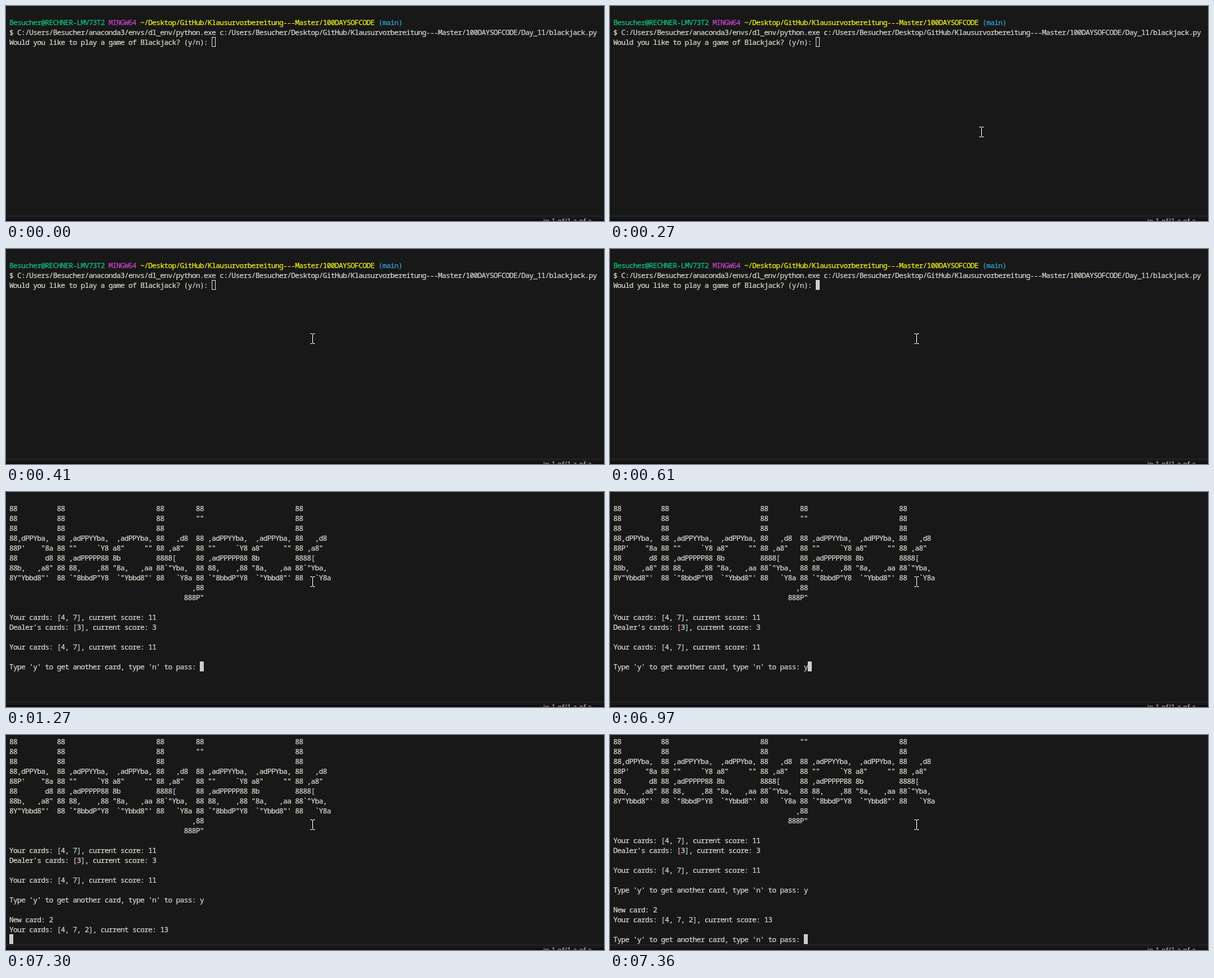
Write an HTML page that moves like this. It is 904 px wide and 326 px high and loops after 8 s.

```html
<!DOCTYPE html>
<html lang="en">
<head>
<meta charset="utf-8">
<title>Blackjack in the terminal</title>
<style>
  html, body { margin: 0; width: 100%; height: 100%; overflow: hidden; background: #181818; }
  #stage { position: relative; width: 904px; height: 326px; overflow: hidden; background: #181818; }
  #stage > * { position: absolute; }
  #term {
    left: 5px; top: 2px; margin: 0; color: #dadad0;
    font: 11px/15px "Noto Sans Mono", "DejaVu Sans Mono", monospace;
    letter-spacing: calc(6px - 1ch);
    font-variant-ligatures: none;
    -webkit-text-stroke: 0.2px currentColor;
  }
  .user { color: #10c880; }
  .sys { color: #c846c8; }
  .dir { color: #f5f51c; }
  .branch { color: #2fa8d8; }
  .open { color: #e3a6e0; }
  .close { color: #a9cfe6; }
  #caret { width: 6px; height: 15px; box-sizing: border-box; border: 1px solid #ccc; }
  #caret.solid { background: #ccc; }
  #rule { left: 0; top: 318px; width: 904px; height: 1px; background: #2b2b2b; }
  #bar { left: 0; top: 323px; width: 904px; height: 3px; background: #140c11; }
  #status { left: 812px; top: 318px; color: #c9c2b8; white-space: pre; font: 11px/16px "Open Sans", sans-serif; }
  #mouse { left: 0; top: 0; filter: drop-shadow(-1px 0 #000); }
</style>
</head>
<body>
<div id="stage">
  <pre id="term"></pre>
  <div id="caret"></div>
  <div id="rule"></div>
  <div id="bar"></div>
  <div id="status">in 1 of/1 a of a</div>
  <svg id="mouse" width="7" height="16" shape-rendering="crispEdges">
    <path d="M0 0h3v1h1v-1h3v1h-3v14h3v1h-3v-1h-1v1h-3v-1h3v-14h-3z" fill="#fff"/>
  </svg>
</div>
<template id="art">88          88                       88        88                       88
88          88                       88        ""                       88
88          88                       88                                 88
88,dPPYba,  88 ,adPPYYba,  ,adPPYba, 88   ,d8  88 ,adPPYYba,  ,adPPYba, 88   ,d8
88P'    "8a 88 ""     `Y8 a8"     "" 88 ,a8"   88 ""     `Y8 a8"     "" 88 ,a8"
88       d8 88 ,adPPPPP88 8b         8888[     88 ,adPPPPP88 8b         8888[
88b,   ,a8" 88 88,    ,88 "8a,   ,aa 88`"Yba,  88 88,    ,88 "8a,   ,aa 88`"Yba,
8Y"Ybbd8"'  88 `"8bbdP"Y8  `"Ybbd8"' 88   `Y8a 88 `"8bbdP"Y8  `"Ybbd8"' 88   `Y8a
                                              ,88
                                            888P"</template>
<script>
const LOOP = 8000, CELL_W = 6, CELL_H = 15, LEFT = 5, TOP = 2;
const $ = id => document.getElementById(id);
const span = (cls, text) => `<span class="${cls}">${text}</span>`;
const tint = line => line
  .replace(/\[/g, span("open", "["))
  .replace(/\]/g, span("close", "]"));

const repo = "Desktop/GitHub/Klausurvorbereitung---Master/100DAYSOFCODE";
const ask = "Would you like to play a game of Blackjack? (y/n): ";
const more = "Type 'y' to get another card, type 'n' to pass: ";
const hand = "Your cards: [4, 7], current score: 11";

const intro = [
  "",
  [span("user", "Besucher@RECHNER-LMV73T2"), span("sys", "MINGW64"),
   span("dir", "~/" + repo), span("branch", "(main)")].join(" "),
  `$ C:/Users/Besucher/anaconda3/envs/dl_env/python.exe c:/Users/Besucher/${repo}/Day_11/blackjack.py`
];
const deal = [
  "", ...$("art").innerHTML.split("\n"), "",
  hand, "Dealer's cards: [3], current score: 3", "",
  hand, ""
].map(tint);
const draw = [
  ...deal, more + "y", "", "New card: 2",
  tint("Your cards: [4, 7, 2], current score: 13")
];

// start time, printed lines, line being typed, rows scrolled off, filled caret
const scenes = [
  [0, intro, ask, 0, false],
  [540, intro, ask, 0, true],
  [940, intro, ask + "y", 0, true],
  [1270, deal, more, 0, true],
  [6970, deal, more + "y", 0, true],
  [7300, draw, "", 1, true],
  [7360, [...draw, ""], more, 2, true]
];

// start time, share of the pointer's way covered
const steps = [[200, 0], [270, 0.5], [340, 0.88], [410, 1]];
const from = [655, 237], to = [460, 128];

const at = (table, t) => table.filter(row => row[0] <= t).pop();
let shown;

function showScene(scene) {
  if (scene === shown) return;
  shown = scene;
  const [, lines, typed, scroll, solid] = scene;
  $("term").innerHTML = [...lines, typed].slice(scroll).join("\n");
  const caret = $("caret");
  caret.style.left = LEFT + typed.length * CELL_W + "px";
  caret.style.top = TOP + (lines.length - scroll) * CELL_H + "px";
  caret.className = solid ? "solid" : "";
}

function showMouse(step) {
  const style = $("mouse").style;
  style.visibility = step ? "visible" : "hidden";
  if (!step) return;
  const [x, y] = from.map((a, i) => Math.round(a + (to[i] - a) * step[1]));
  style.transform = `translate(${x}px, ${y}px)`;
}

const start = performance.now();
function frame() {
  const t = (performance.now() - start) % LOOP;
  showScene(at(scenes, t));
  showMouse(at(steps, t));
  requestAnimationFrame(frame);
}
frame();
</script>
</body>
</html>
```
